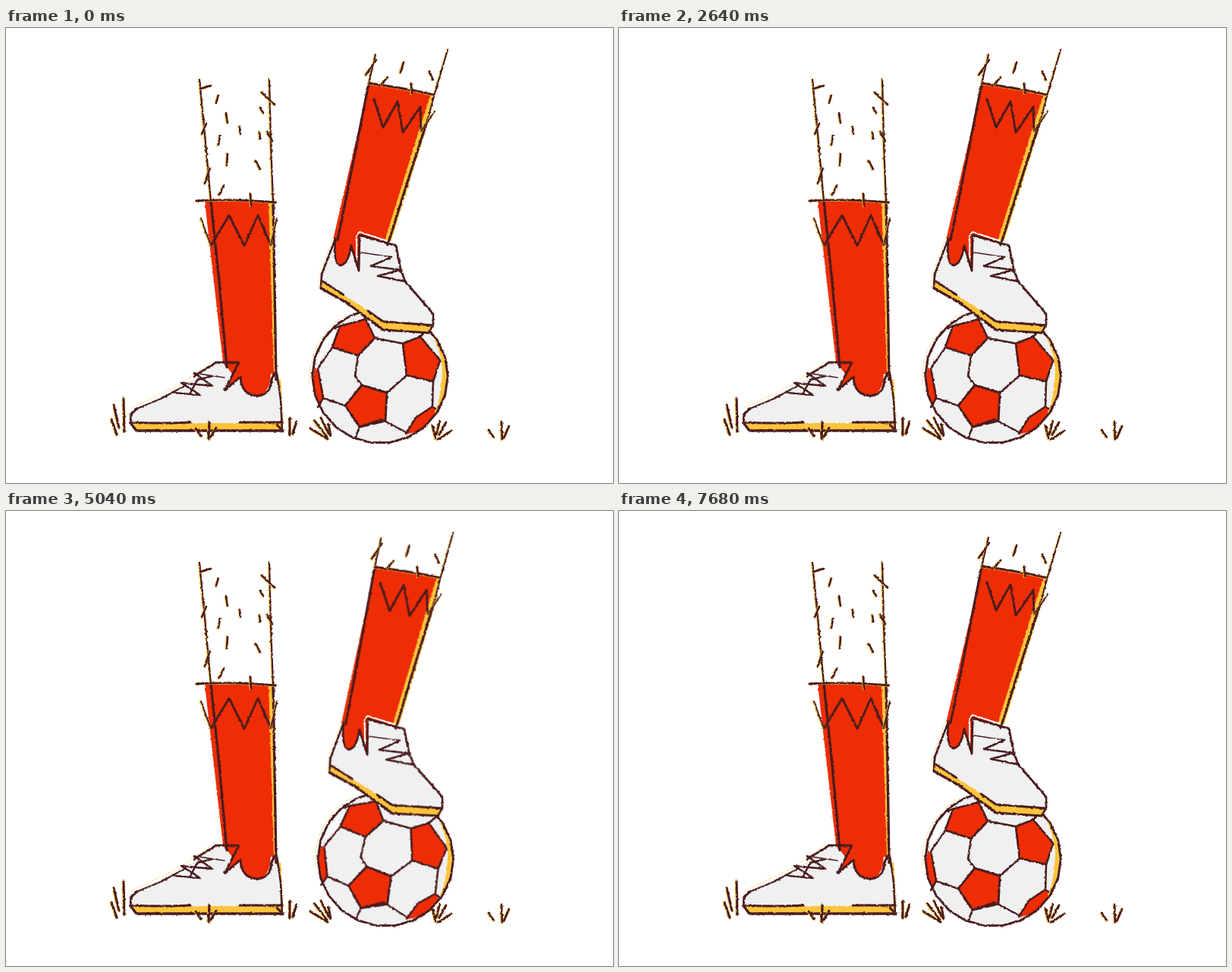
Write an HTML page that moves like this. It is 800 px wide and 600 px high and loops after 7800 ms.

```html
<!DOCTYPE html>
<html lang="en">
<head>
<meta charset="utf-8">
<title>Ball under foot</title>
<style>
  html, body { margin: 0; width: 100%; height: 100%; overflow: hidden; background: #fff; }
  svg { display: block; width: 800px; height: 600px; }
</style>
</head>
<body>
<svg id="stage" viewBox="0 0 800 600" xmlns="http://www.w3.org/2000/svg">
  <defs>
    <filter id="crayon" filterUnits="userSpaceOnUse" x="0" y="0" width="800" height="600" color-interpolation-filters="sRGB">
      <feTurbulence type="fractalNoise" baseFrequency="0.28" numOctaves="2" seed="7"/>
      <feDisplacementMap in="SourceGraphic" scale="2.8" xChannelSelector="R" yChannelSelector="G"/>
    </filter>
  </defs>
</svg>
<script>
const NS = 'http://www.w3.org/2000/svg';
const RED = '#ee2d04', INK = '#4a1c1e', GOLD = '#fbc43c', PALE = '#f0f0f0', HALO = '#fbe5a8';
const stage = document.getElementById('stage');

function add(parent, tag, attrs) {
  const el = document.createElementNS(NS, tag);
  for (const key in attrs) el.setAttribute(key, attrs[key]);
  return parent.appendChild(el);
}
const group = parent => add(parent, 'g', {});
const rough = parent => add(parent, 'g', { filter: 'url(#crayon)' });
const fill = (parent, d, color) => add(parent, 'path', { d, fill: color });
const stroke = (parent, d, color, width) => add(parent, 'path', {
  d, fill: 'none', stroke: color, 'stroke-width': width,
  'stroke-linecap': 'round', 'stroke-linejoin': 'round'
});
const ink = (parent, d, width = 3.2) => stroke(parent, d, INK, width);

// dark line with a thin golden fringe
function fringed(parent, d, width) {
  stroke(parent, d, GOLD, width + 0.6).setAttribute('transform', 'translate(-.6 .3)');
  ink(parent, d, width);
}

function drawGrass(parent) {
  fringed(parent, 'M139 516L146 536M142 497L149 527M155 488L156 532', 3);
  fringed(parent, 'M374 514V537M383 519L378 535', 3);
  fringed(parent, 'M401 528L424 542M406 517L423 539M415 514L427 538M425 522L428 537', 2.8);
  fringed(parent, 'M562 524L566 541M572 518L567 536M580 520L571 536M587 531L569 543', 2.8);
  fringed(parent, 'M636 530L643 540M653 519L654 543M663 525L656 541', 2.8);
}

function drawStandingLeg(parent) {
  stroke(parent, 'M165 501L228 471L274 438', HALO, 1);
  fill(parent, 'M163 521L166 508L173 502L236 471L277 441H307L357 455L363 521Z', PALE);
  fill(parent, 'M165 521H364V531H171Z', GOLD);
  fill(parent, 'M345 229H353L356 462L352 456Z', GOLD);
  fill(parent, 'M262 229L346 228L353 456Q350 484 333 485Q310 484 309 460L288 479L299 457L286 441Z', RED);
  stroke(parent, 'M350 457Q350 472 343 480', '#fff', 2.5);
  stroke(parent, 'M361 465L364 522', GOLD, 2.5);

  fringed(parent, 'M255 68L262 140L270 228', 2.2);
  fringed(parent, 'M347 67L349 150L352 229', 2.2);
  ink(parent, 'M270 228L281 335L291 447', 3.3);
  ink(parent, 'M352 229L354 340L356 464', 3.3);
  fringed(parent, 'M251 228Q300 225 356 230', 2.8);
  ink(parent, 'M270 287L294 247L314 287L332 247L349 286', 3);
  fringed(parent, 'M257 251L270 287M349 286L357 251', 2);

  fringed(parent, 'M256 80L270 76M280 88L277 99M337 85L354 101M335 105L339 112M290 113L292 125', 2.6);
  fringed(parent, 'M258 140L264 126M308 130L309 140M334 137L335 146M344 137L351 149M282 142L280 154', 2.6);
  fringed(parent, 'M292 166L291 181M329 175L335 186M262 205L269 184M287 208L281 220M322 218L323 234', 2.6);

  ink(parent, 'M170 503L204 489L237 471', 2.4);
  ink(parent, 'M164 520L165 509L172 502');
  ink(parent, 'M248 459L277 441H307L288 478L309 460Q310 485 333 485Q349 483 350 463L354 455', 2.9);
  ink(parent, 'M357 455L362 490L364 531', 2.6);
  ink(parent, 'M288 461L248 455', 1.5);
  ink(parent, 'M248 455L272 472L231 468L256 484L222 481M243 481L252 464L272 459', 2.6);
  ink(parent, 'M164 520Q205 522 243 520M308 520H365');
  ink(parent, 'M164 521L172 531H365', 3.6);
  ink(parent, 'M357 523L365 532', 2.8);
  fringed(parent, 'M250 528L257 538M268 519L267 542M277 527L270 539', 3);
}

function drawMovingLeg(parent) {
  stroke(parent, 'M431 276L412 327L412 341', HALO, 1);
  fill(parent, 'M434 277L416 326L415 340L497 388L562 393L563 377L524 332L514 287L466 272Z', PALE);
  fill(parent, 'M415 333L445 352L477 372L497 387L562 392L557 402L497 398L450 364L415 344Z', GOLD);
  fill(parent, 'M553 86L564 88L556 126L506 286L496 283Z', GOLD);
  fill(parent, 'M479 71L560 87L544 136L498 284L466 272L465 320L455 287Q452 313 441 313Q432 309 432 275Z', RED);
  stroke(parent, 'M462 318L462 273L466 269L512 284', '#fff', 2);

  fringed(parent, 'M487 35L478 73', 2);
  fringed(parent, 'M582 29L564 90L556 120', 2.1);
  ink(parent, 'M478 73L459 170L437 280');
  ink(parent, 'M556 120L530 200L503 286');
  fringed(parent, 'M478 73Q525 79 564 88', 2.8);
  ink(parent, 'M485 94L497 131L516 97L523 138L546 104L547 136', 2.9);
  fringed(parent, 'M547 136L565 110', 1.8);
  fringed(parent, 'M488 42L474 62M524 45L520 59M558 57L563 69M503 65L495 74M534 73L535 86', 2.6);

  ink(parent, 'M434 278Q431 312 441 313Q451 311 455 287L465 320L466 273L514 287L520 318L526 334', 2.9);
  ink(parent, 'M526 334L563 377V391L557 402', 2.7);
  ink(parent, 'M434 278L416 325L415 343', 2.7);
  ink(parent, 'M468 296L508 302', 1.5);
  ink(parent, 'M508 302L481 314L520 319L490 327L525 334', 2.7);
  ink(parent, 'M416 333L445 352M477 373L497 387L562 392', 2.8);
  ink(parent, 'M415 343L450 363L497 398L557 402');
}

function drawBallBase(parent) {
  add(parent, 'circle', { cx: 493, cy: 459, r: 88.5, fill: PALE });
  stroke(parent, 'M446 379Q396 414 400 470', HALO, 1);
}

function drawBallPanels(parent) {
  fill(parent, 'M439 393L473 384L485 409L463 432L429 421Z', RED);
  fill(parent, 'M522 416L545 407L571 437L562 466L527 458Z', RED);
  fill(parent, 'M469 471L502 481L500 518L466 526L447 498Z', RED);
  fill(parent, 'M407 448L412 452L420 488L412 496L404 465Z', RED);
  fill(parent, 'M527 536L540 514L563 499L568 507L549 530Z', RED);
  fill(parent, 'M408 443L430 421L439 393L424 405Z', '#fbfbfb');
  ink(parent, 'M440 393L474 384L486 409L464 432L430 421Z', 2.7);
  ink(parent, 'M523 416L546 407L572 438L563 466L528 458Z', 2.7);
  ink(parent, 'M469 471L502 481L500 518L466 526L447 498Z', 2.9);
  ink(parent, 'M464 432L460 459L469 471M486 409L523 416M528 458L502 481', 2.7);
  ink(parent, 'M430 421L411 449L418 488L447 498M418 488L411 500', 2.5);
  ink(parent, 'M440 393L430 397M474 384L469 375M546 407L557 396M572 438L581 441', 2.5);
  ink(parent, 'M563 466L562 499L540 514L527 535M562 499L570 505', 2.5);
  ink(parent, 'M460 541L466 526L495 516L527 533', 2.5);
}

function drawBallRim(parent) {
  fill(parent, 'M557 396Q579 420 582 452Q582 490 564 511Q574 487 575 452Q573 422 557 396Z', GOLD);
  const pts = [];
  for (let i = 0; i < 22; i++) {
    const a = i / 22 * 2 * Math.PI;
    pts.push((493 + 89.3 * Math.cos(a)).toFixed(1) + ' ' + (459 + 88.6 * Math.sin(a)).toFixed(1));
  }
  ink(parent, 'M' + pts.join('L') + 'Z', 2.9);
}

drawGrass(rough(stage));
drawStandingLeg(rough(stage));

const ball = group(stage);
drawBallBase(rough(ball));
const panels = group(ball);
drawBallPanels(rough(panels));
drawBallRim(rough(ball));

const leg = group(stage);
drawMovingLeg(rough(leg));

const STEP = 120, LOOP = 7800;
const ROLL = 25, RADIUS = 90, SWING = -2.6;
// [rise start, rise end, fall start, fall end] in steps
const rolls = [[3.7, 12, 12.5, 21], [37.9, 46.4, 49.7, 58.2]];

function ease(a, b, x) {
  const u = Math.min(1, Math.max(0, (x - a) / (b - a)));
  return (1 - Math.cos(Math.PI * u)) / 2;
}

function pose(time) {
  const step = Math.max(0, Math.floor((time % LOOP) / STEP) - 1);
  let k = 0;
  for (const [a, b, c, d] of rolls) k += ease(a, b, step) - ease(c, d, step);
  const dx = ROLL * k;
  ball.setAttribute('transform', `translate(${dx} 0)`);
  panels.setAttribute('transform', `rotate(${dx / RADIUS * 180 / Math.PI} 493 459)`);
  leg.setAttribute('transform', `rotate(${SWING * k} 565 -520)`);
}

const start = performance.now();
function tick(now) {
  pose(Math.max(0, now - start));
  requestAnimationFrame(tick);
}
pose(0);
requestAnimationFrame(tick);
</script>
</body>
</html>
```
